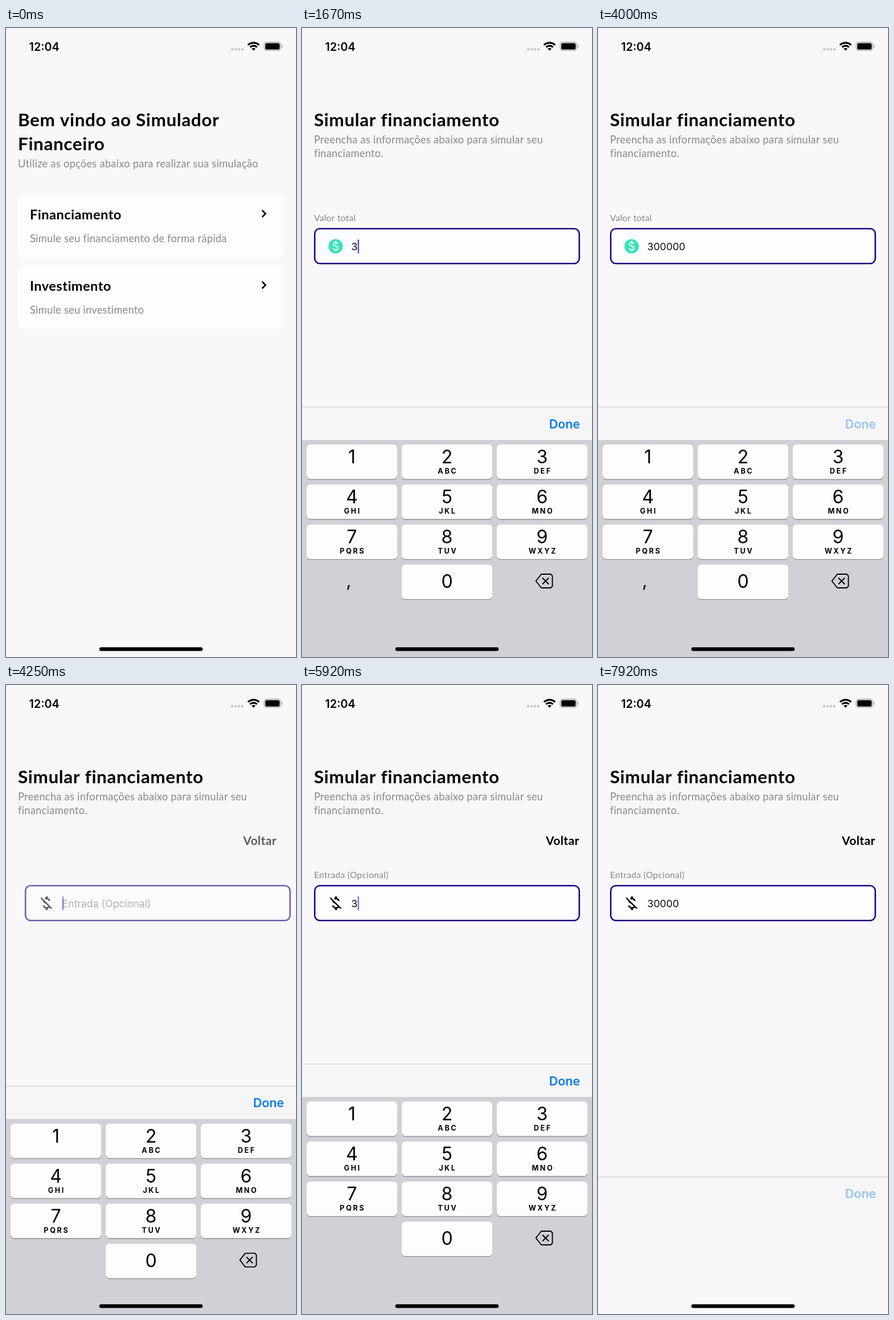
Write an HTML page with a canvas that moves like this. It is 509x1101 px and loops after 8 s.

```html
<!DOCTYPE html>
<html lang="pt">
<head>
<meta charset="utf-8">
<title>Simulador Financeiro</title>
<style>
  html, body { margin: 0; width: 100%; height: 100%; overflow: hidden; background: #f9f7fa; }
  canvas { display: block; width: 509px; height: 1101px; }
</style>
</head>
<body>
<canvas id="stage"></canvas>
<script>
const W = 509, H = 1101, LOOP = 8000, TICK = 1000 / 12;
const BG = '#f9f7fa', CARD = '#fdfcff', GREY = '#89888c', INK = '#000';
const BODY = 'Lato, "Open Sans", sans-serif';
const SYSTEM = 'Inter, Roboto, sans-serif';

// Moments of the story, in ms
const PUSH = 454, FOCUS = 880, HIDE_1 = 4000, SWAP = 4078, RISE = 4085, HIDE_2 = 7833;
const KB_TOP = 664, KB_HEIGHT = H - KB_TOP;

// Key taps: [key, down, up]; the digit is entered on release
const TAPS = [
  [3, 1490, 1660], [0, 1825, 1910], [0, 2075, 2160], [0, 2660, 2825],
  [0, 2910, 3075], [0, 3245, 3410],
  [3, 5660, 5825], [0, 6245, 6490], [0, 6660, 6825], [0, 6910, 7075], [0, 7160, 7325]
];
// Spans in which the caret is blinked off
const BLINKS = [[2300, 2420], [3640, 4078], [4590, 4930], [5560, 5800]];

const MONEY_OFF = new Path2D('M12.5 6.9c1.78 0 2.44.85 2.5 2.1h2.21c-.07-1.72-1.12-3.3-3.21-3.81V3h-3v2.16c-.53.12-1.03.3-1.48.54l1.47 1.47c.41-.17.91-.27 1.51-.27zM5.33 4.06L4.06 5.33 7.5 8.77c0 2.08 1.56 3.21 3.91 3.91l3.51 3.51c-.34.48-1.05.91-2.42.91-2.06 0-2.87-.92-2.98-2.1h-2.2c.12 2.19 1.76 3.42 3.68 3.83V21h3v-2.15c.96-.18 1.82-.55 2.45-1.12l2.22 2.22 1.27-1.27z');
const DOLLAR = new Path2D('M12.88 17.76V19h-1.75v-1.29c-.74-.18-2.39-.77-3.02-2.96l1.65-.67c.06.22.58 2.09 2.4 2.09.93 0 1.98-.48 1.98-1.61 0-.96-.7-1.46-2.28-2.03-1.1-.39-3.35-1.03-3.35-3.31 0-.1.01-2.4 2.62-2.96V5h1.75v1.24c1.84.32 2.51 1.79 2.66 2.23l-1.58.67c-.11-.35-.59-1.34-1.9-1.34-.7 0-1.81.37-1.81 1.39 0 .95.86 1.31 2.64 1.9 2.4.83 3.01 2.05 3.01 3.45 0 2.63-2.5 3.13-3.02 3.22z');

const canvas = document.getElementById('stage');
const ctx = canvas.getContext('2d');
const ratio = window.devicePixelRatio || 1;
canvas.width = Math.round(W * ratio);
canvas.height = Math.round(H * ratio);

const clamp = v => Math.min(1, Math.max(0, v));
const easeInOut = x => x < 0.5 ? 2 * x * x : 1 - 2 * (1 - x) ** 2;

// Distance left on a critically damped spring after ms
function springLeft(ms) {
  const z = Math.max(0, ms) * 0.01826;
  return (1 + z) * Math.exp(-z);
}

function text(str, x, y, size, color, { weight = 400, family = BODY, align = 'left', gap } = {}) {
  const tracking = family === SYSTEM ? 0 : weight > 400 ? 0.021 : 0.014;
  ctx.font = `${weight} ${size}px ${family}`;
  ctx.letterSpacing = `${gap ?? size * tracking}px`;
  ctx.textAlign = align;
  ctx.fillStyle = color;
  ctx.fillText(str, x, y);
}

function box(x, y, w, h, r, color) {
  ctx.beginPath();
  ctx.roundRect(x, y, w, h, r);
  ctx.fillStyle = color;
  ctx.fill();
}

function line(points, width, color = INK, close = false) {
  ctx.beginPath();
  points.forEach(([x, y]) => ctx.lineTo(x, y));
  if (close) ctx.closePath();
  ctx.lineWidth = width;
  ctx.strokeStyle = color;
  ctx.stroke();
}

function icon(path, x, y, color) {
  ctx.save();
  ctx.translate(x, y);
  ctx.scale(1.305, 1.305);
  ctx.translate(-12, -12);
  ctx.fillStyle = color;
  ctx.fill(path);
  ctx.restore();
}

function card(y, title, note, alpha) {
  ctx.globalAlpha = alpha;
  box(21, y, 467, 112, 11, CARD);
  text(title, 42, y + 45, 23.5, INK, { weight: 700 });
  text(note, 42, y + 85, 18.3, GREY);
  line([[449.5, y + 29], [455.5, y + 35], [449.5, y + 41]], 2.6);
  ctx.globalAlpha = 1;
}

function home(t) {
  ctx.fillStyle = BG;
  ctx.fillRect(0, 0, W, H);
  text('Bem vindo ao Simulador', 21, 171.5, 31.4, INK, { weight: 700 });
  text('Financeiro', 21, 214, 31.4, INK, { weight: 700 });
  text('Utilize as opções abaixo para realizar sua simulação', 21, 244, 18.3, GREY);
  card(290, 'Financiamento', 'Simule seu financiamento de forma rápida', t > 410 && t < PUSH ? 0.6 : 1);
  card(415, 'Investimento', 'Simule seu investimento', 1);
}

function typed(t, second) {
  return TAPS.filter(tap => (tap[1] > SWAP) === second && tap[2] <= t).map(tap => tap[0]).join('');
}

function caretAlpha(t) {
  if (t < FOCUS || (t >= HIDE_1 && t < SWAP) || t >= HIDE_2) return 0;
  return Math.min(...BLINKS.map(([a, b]) => Math.max(clamp((a + 160 - t) / 160), clamp((t - b) / 150))));
}

function field(t, second) {
  const name = second ? 'Entrada (Opcional)' : 'Valor total';
  const value = typed(t, second);
  const alpha = ctx.globalAlpha;
  box(21, 350, 467, 63.5, 10, CARD);
  if (t >= FOCUS) {
    ctx.beginPath();
    ctx.roundRect(22.3, 351.3, 464.4, 60.9, 9);
    ctx.lineWidth = 2.6;
    ctx.strokeStyle = '#1b0880';
    ctx.stroke();
  }
  if (second) {
    icon(MONEY_OFF, 59, 382, INK);
  } else {
    ctx.beginPath();
    ctx.arc(59, 382, 12.6, 0, 7);
    ctx.fillStyle = '#39e4ba';
    ctx.fill();
    icon(DOLLAR, 59, 382, '#fff');
  }
  text(value || name, 86.5, 388.5, 17.7, value ? '#0c0c0e' : GREY, { family: SYSTEM });
  const end = value ? ctx.measureText(value).width : 0;
  ctx.globalAlpha = alpha * caretAlpha(t);
  box(86.7 + end, 370, 2.6, 24.5, 1.3, '#4a5fc4');
  ctx.globalAlpha = alpha;
  if (value) text(name, 21, 337.5, 15.7, GREY);
}

function form(t) {
  ctx.fillStyle = BG;
  ctx.fillRect(0, 0, W, H);
  text('Simular financiamento', 21, 171.5, 31.4, INK, { weight: 700 });
  text('Preencha as informações abaixo para simular seu', 21, 201.5, 18.3, GREY);
  text('financiamento.', 21, 226, 18.3, GREY);
  const second = t >= SWAP;
  const p = second ? easeInOut(clamp((t - SWAP) / 300)) : 1;
  const shift = 32.6 * (1 - p);
  ctx.save();
  ctx.globalAlpha = p;
  if (second) text('Voltar', 428 - shift, 280, 20.9, INK, { weight: 700 });
  ctx.translate(shift, 0);
  field(t, second);
  ctx.restore();
}

function key(digit, letters, col, row, down) {
  const x = 8 + col * 167, y = 729 + row * 70.1;
  box(x, y + 1.3, 159, 60.5, 6.5, '#898b90');
  box(x, y, 159, 60.5, 6.5, down ? '#b4c0cd' : '#fdfcfe');
  text(digit, x + 79.5, y + (digit ? 33 : 41), 32, INK, { family: SYSTEM, align: 'center' });
  text(letters, x + 80.8, y + 51, 12.6, INK, { family: SYSTEM, weight: 700, align: 'center', gap: 2.6 });
}

function keys(t) {
  const rows = ['', 'ABC', 'DEF', 'GHI', 'JKL', 'MNO', 'PQRS', 'TUV', 'WXYZ'];
  const held = TAPS.find(tap => t >= tap[1] && t < tap[2]);
  const isDown = n => !!held && held[0] === n;
  ctx.fillStyle = '#d0d1d6';
  ctx.fillRect(0, 721, W, H);
  rows.forEach((letters, i) => key(i + 1, letters, i % 3, Math.floor(i / 3), isDown(i + 1)));
  key(0, '', 1, 3, isDown(0));
  if (t < SWAP) text(',', 82, 978, 31, INK, { family: SYSTEM, align: 'center' });
  ctx.lineJoin = 'round';
  line([[410.5, 968], [420, 956], [436.5, 956], [439.5, 959], [439.5, 977], [436.5, 980], [420, 980]], 1.9, INK, true);
  line([[422, 962.5], [433, 973.5]], 1.9);
  line([[433, 962.5], [422, 973.5]], 1.9);
  ctx.lineJoin = 'miter';
}

function keyboardOffset(t) {
  if (t < HIDE_1) return KB_HEIGHT * springLeft(t - FOCUS);
  if (t < RISE) return KB_HEIGHT * (1 - springLeft(t - HIDE_1));
  if (t < HIDE_2) return 196 * springLeft(t - RISE);
  return KB_HEIGHT * (1 - springLeft(t - HIDE_2));
}

function doneAlpha(t) {
  if (t >= 7745) return 0.4;
  if (t >= 3990 && t < 4250) return 0.4 + 0.6 * clamp((t - 4085) / 160);
  return 1;
}

function keyboard(t) {
  if (t < FOCUS) return;
  const hiding = (t > HIDE_1 + 1 && t < RISE) || t > HIDE_2 + 1;
  ctx.save();
  ctx.translate(0, keyboardOffset(t));
  ctx.fillStyle = '#f6f5f7';
  ctx.fillRect(0, KB_TOP, W, 57);
  ctx.fillStyle = '#c9c8cc';
  ctx.fillRect(0, KB_TOP - 1, W, 1);
  ctx.globalAlpha = doneAlpha(t);
  text('Done', 488, 700.5, 21.4, '#077bea', { family: SYSTEM, weight: 600, align: 'right' });
  ctx.globalAlpha = 1;
  if (!hiding) keys(t);
  ctx.restore();
}

function statusBar() {
  text('12:04', 40.6, 40, 19.7, INK, { family: SYSTEM, weight: 600 });
  for (let i = 0; i < 4; i++) box(394.8 + i * 6, 35, 4.4, 4.4, 2.2, '#c8c7cb');
  const arc = (r, width) => {
    ctx.beginPath();
    ctx.arc(434.5, 39.7, r, -Math.PI * 0.75, -Math.PI * 0.25);
    ctx.lineWidth = width;
    ctx.strokeStyle = INK;
    ctx.stroke();
  };
  arc(13.8, 3.2);
  arc(8.6, 3.2);
  arc(2.4, 4.8);
  ctx.beginPath();
  ctx.roundRect(453.2, 24.7, 29, 14.8, 4.4);
  ctx.lineWidth = 1.2;
  ctx.strokeStyle = '#a3a2a6';
  ctx.stroke();
  box(455, 26.5, 25.4, 11.2, 2.8, INK);
  box(483.6, 29.7, 1.7, 4.8, 1, '#a3a2a6');
}

function draw(t) {
  ctx.setTransform(ratio, 0, 0, ratio, 0, 0);
  const left = springLeft(t - PUSH);
  const x = left < 0.0005 ? 0 : left * W;
  if (x > 0) {
    ctx.save();
    ctx.translate(-0.3 * (W - x), 0);
    home(t);
    ctx.restore();
    ctx.fillStyle = `rgba(0, 0, 0, ${0.095 * (1 - left)})`;
    ctx.fillRect(0, 0, W, H);
  }
  if (x < W) {
    ctx.save();
    ctx.translate(x, 0);
    form(t);
    ctx.restore();
  }
  keyboard(t);
  statusBar();
  box(163.8, 1084, 181.4, 6.5, 3.2, INK);
}

const start = performance.now();
function frame() {
  const t = (performance.now() - start) % LOOP;
  draw(Math.floor(t / TICK + 0.001) * TICK);
  requestAnimationFrame(frame);
}
draw(0);
requestAnimationFrame(frame);
</script>
</body>
</html>
```
